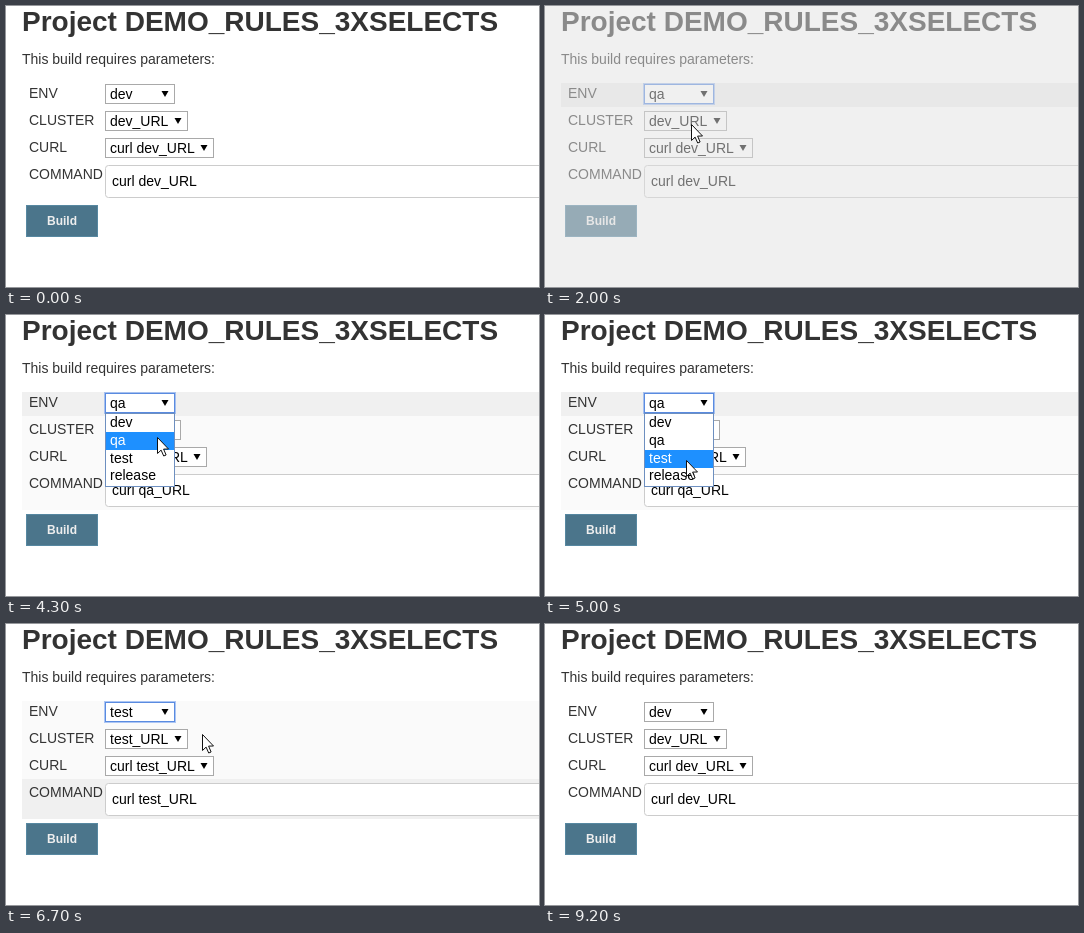
These frames come from a looping animation (533x281 px, 9.3 s). An HTML page with a canvas:

```html
<!DOCTYPE html>
<html lang="en">
<head>
<meta charset="utf-8">
<title>Build parameters</title>
<style>
  html, body { margin: 0; width: 533px; height: 281px; overflow: hidden; background: #fff; }
  canvas { display: block; }
</style>
</head>
<body>
<canvas id="stage" width="533" height="281"></canvas>
<script>
const ctx = document.getElementById('stage').getContext('2d');
const LOOP = 9300, STEP = 100;
const FONT = '"Liberation Sans", Arial, sans-serif';
const LABELS = ['ENV', 'CLUSTER', 'CURL', 'COMMAND'];
const OPTIONS = ['dev', 'qa', 'test', 'release'];
const LEAVE = 8200, BLUR = 9200;
const ROW = 27, ITEM = 17.8, LIST_TOP = 99;

// The ENV list opens, then a value is chosen; the other fields follow one step later
const picks = [
  { open: 1100, done: 2000, value: 'qa' },
  { open: 4000, done: 5700, value: 'test' },
  { open: 7100, done: 7800, value: 'dev' }
];

// Pointer moves: start and end time, then where it comes to rest
const entry = { t: 300, x: 409, y: 47 };
const moves = [
  [300, 800, 155, 85],
  [1100, 1500, 147, 119],
  [2700, 3100, 172, 211],
  [3100, 3400, 157, 141],
  [3400, 3700, 155, 84],
  [4000, 4300, 152, 123],
  [4300, 4900, 149, 106],
  [4900, 5000, 142, 146],
  [5600, 5700, 166, 142],
  [6200, 6500, 313, 178],
  [6500, 6800, 156, 88],
  [7300, 7500, 170, 104],
  [7800, 8100, 457, 160]
];

const ease = k => k * k * (3 - 2 * k);
const clamp = (v, lo, hi) => Math.min(hi, Math.max(lo, v));

function valueAt(t) {
  const done = picks.filter(p => p.done <= t);
  return done.length ? done[done.length - 1].value : 'dev';
}

function pointerAt(t) {
  if (t < entry.t || t >= LEAVE) return null;
  let { x, y } = entry;
  for (const [from, to, toX, toY] of moves) {
    const k = ease(clamp((t - from) / (to - from), 0, 1));
    x += (toX - x) * k;
    y += (toY - y) * k;
  }
  return { x: Math.round(x), y: Math.round(y) };
}

function box(x, y, w, h, color) {
  ctx.fillStyle = color;
  ctx.fillRect(x, y, w, h);
}

function frame(x, y, w, h, color) {
  ctx.strokeStyle = color;
  ctx.strokeRect(x + 0.5, y + 0.5, w - 1, h - 1);
}

function text(str, x, y, color, size = 14, weight = 'normal') {
  ctx.font = `${weight} ${size}px ${FONT}`;
  ctx.fillStyle = color;
  ctx.fillText(str, x, y);
}

function poly(points, color) {
  ctx.beginPath();
  points.forEach(([x, y]) => ctx.lineTo(x, y));
  ctx.closePath();
  ctx.fillStyle = color;
  ctx.fill();
}

function drawSelect(row, label, w, focus) {
  const y = 78 + ROW * row, cx = 89 + w;
  box(99, y, w, 20, '#fff');
  frame(99, y, w, 20, focus ? '#5a8be0' : '#a9a9a9');
  if (focus) frame(98, y - 1, w + 2, 22, 'rgba(77,134,235,0.45)');
  text(label, 104, y + 15, '#000');
  poly([[cx - 3.5, y + 7], [cx + 3.5, y + 7], [cx, y + 13]], '#000');
}

function fitted(label) {
  ctx.font = `14px ${FONT}`;
  return Math.round(ctx.measureText(label).width) + 25;
}

function drawRows(t, envLit) {
  const tip = pointerAt(t - STEP);
  const lit = envLit ? 0 : tip ? Math.floor((tip.y - 74) / ROW) : -1;
  const base = envLit === 'busy' ? '#fff' : '#fafafa';
  LABELS.forEach((label, i) => {
    const top = Math.max(77, 74 + ROW * i);
    const bottom = i < 3 ? 101 + ROW * i : 195;
    box(16, top, 517, bottom - top, i === lit ? '#f0f0f0' : base);
  });
}

function drawForm(t) {
  const focus = t >= picks[0].open && t < BLUR;
  const url = valueAt(t - STEP) + '_URL';
  const curl = 'curl ' + url;

  text('Project DEMO_RULES_3XSELECTS', 16, 25, '#333', 28, 'bold');
  text('This build requires parameters:', 16, 58, '#333');
  LABELS.forEach((label, i) => text(label, 23, 92 + ROW * i, '#333'));

  drawSelect(0, valueAt(t), 70, focus);
  drawSelect(1, url, fitted(url));
  drawSelect(2, curl, fitted(curl) - 1);

  ctx.beginPath();
  ctx.roundRect(99.5, 159.5, 460, 32, 3);
  ctx.fillStyle = '#fff';
  ctx.fill();
  ctx.strokeStyle = '#ccc';
  ctx.stroke();
  text(curl, 106, 180, '#000');

  box(20, 199, 72, 32, '#4b758b');
  frame(20, 199, 72, 32, '#5788a1');
  text('Build', 41, 219, '#eee', 12, 'bold');
}

function drawList(active) {
  box(99, 98, 70, 74, '#fff');
  OPTIONS.forEach((name, i) => {
    const y = LIST_TOP + Math.round(i * ITEM), on = i === active;
    if (on) box(100, y, 68, 18, '#1e90ff');
    text(name, 104, y + 13, on ? '#fff' : '#000');
  });
  frame(99, 98, 70, 74, '#6d8fc0');
}

function drawPointer({ x, y }) {
  ctx.save();
  ctx.translate(x - 0.5, y - 0.5);
  poly([[0, 0], [0, 16], [3.6, 12.6], [6.2, 18.5], [8.6, 17.5], [6.1, 11.6], [11, 11.5]], '#fff');
  ctx.strokeStyle = '#111';
  ctx.stroke();
  ctx.restore();
}

function draw(t) {
  const tip = pointerAt(t);
  const open = picks.some(p => t >= p.open && t < p.done);
  const busy = picks.some(p => t >= p.done && t < p.done + STEP);

  box(0, 0, 533, 281, '#fff');
  if (t >= picks[0].done && t < LEAVE) drawRows(t, busy ? 'busy' : open && 'open');
  drawForm(t);
  if (open) {
    const item = Math.floor((tip.y - LIST_TOP) / ITEM);
    drawList(item < 0 ? OPTIONS.indexOf(valueAt(t)) : Math.min(item, 3));
  }
  if (busy) box(0, 0, 533, 281, 'rgba(225,225,225,0.5)');
  if (tip) drawPointer(tip);
}

const start = performance.now();
function tick() {
  const t = (performance.now() - start) % LOOP;
  draw(Math.floor(t / STEP) * STEP);
  requestAnimationFrame(tick);
}
tick();
</script>
</body>
</html>
```
